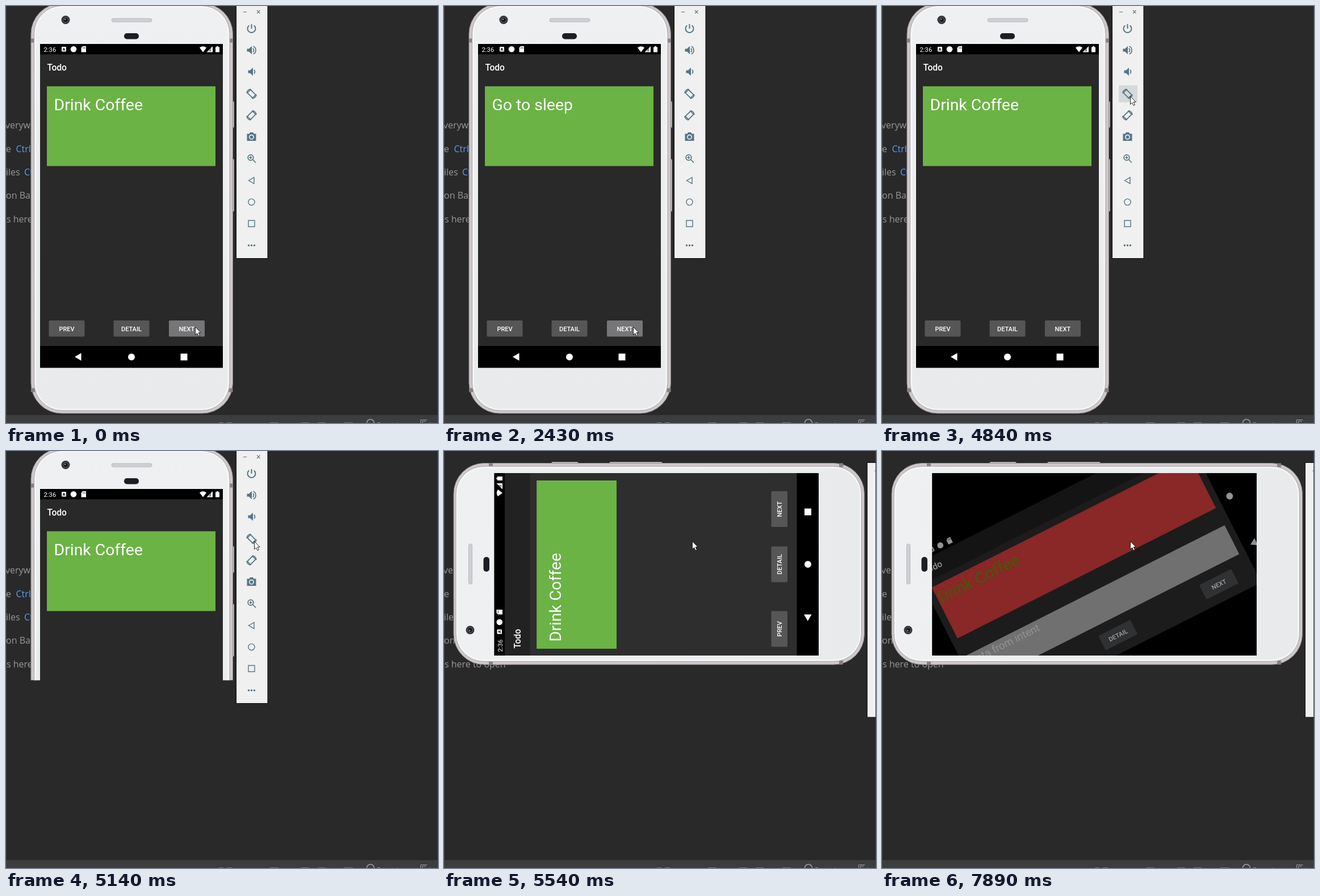
These frames come from a looping animation (761x736 px, 8000 ms). An HTML page:

```html
<!DOCTYPE html>
<html lang="en">
<head>
<meta charset="utf-8">
<title>Todo app in an emulator</title>
<style>
html, body { margin: 0; width: 100%; height: 100%; overflow: hidden; background: #292929; }
svg { display: block; }
.ui { font: 16px "Open Sans", sans-serif; fill: #989898; }
.app { font-family: Roboto, sans-serif; fill: #fff; }
.title { font-size: 15.6px; font-weight: 500; }
.task { font-size: 28.4px; }
.btn { font-size: 11px; font-weight: 500; text-anchor: middle; }
.line { fill: none; stroke: #557584; stroke-width: 1.7; }
.solid { fill: #557584; }
</style>
</head>
<body>
<svg width="761" height="736" viewBox="0 0 761 736">
  <defs>
    <clipPath id="glass"><rect x="60" y="67" width="322" height="571.5"/></clipPath>
    <clipPath id="wide"><rect x="88.5" y="39" width="571.5" height="322"/></clipPath>
    <clipPath id="upper"><rect width="761" height="404.5"/></clipPath>
    <linearGradient id="shell" x2="0" y2="1">
      <stop offset="0" stop-color="#eff0f2"/><stop offset="1" stop-color="#e8eaec"/>
    </linearGradient>
    <g id="notes" fill="#fff">
      <rect x="98" y="72" width="8" height="8.5" rx="1"/>
      <path d="M100 79l2-5 2 5M101 77.4h2" fill="none" stroke="#000"/>
      <circle cx="119" cy="76.3" r="5.3"/>
      <path d="M135 71h6v10.500h-8.500v-7.500z"/>
      <path d="M135.500 73v2M137.500 73v2M139.300 73v2" stroke="#000" stroke-width=".8"/>
    </g>
    <g id="turn">
      <rect x="-4" y="-6.500" width="8" height="13" rx="1" class="line" transform="rotate(-45)"/>
      <path d="M-8.500-1a8.500 8.500 0 0 1 6-7.300l2 2M8.500 1a8.500 8.500 0 0 1-6 7.300l-2-2" class="line" stroke-width="1.4"/>
    </g>
  </defs>

  <rect width="761" height="736" fill="#292929"/>
  <g class="ui">
    <text x="-1" y="216">verywhere</text>
    <text x="0" y="258">e</text><text x="17.500" y="258" fill="#589df6">Ctrl</text>
    <text x="0" y="299">iles</text><text x="32" y="299" fill="#589df6">Ctrl</text>
    <text x="0" y="340">on Bar</text>
    <text x="1" y="382">s here to open</text>
  </g>
  <rect y="722" width="761" height="14" fill="#3b3d3f"/>
  <g fill="none" stroke="#a0a0a0">
    <circle cx="642" cy="736" r="6.500" stroke-width="1.500"/>
    <path d="M730.500 736v-5.500h11M733.500 736v-3h6"/>
    <path d="M375 735.500h8M389 735.500h9M465 735.500h15M520 735.500h14M549 735.500h14M596 735.500h15" stroke="#777"/>
  </g>
  <text x="653" y="744" class="ui" style="font-size:12px">Event Log</text>
  <text x="745" y="744" class="ui" style="font-size:12px">Lay</text>
  <path d="M.5 0v736M760.500 0v736" stroke="#404244"/>

  <g id="cut"><g id="phone">
    <rect x="396" y="168" width="5.500" height="47" rx="2" fill="#d9d4d5" stroke="#8b8687"/>
    <rect x="396" y="270" width="5.500" height="93" rx="2" fill="#d9d4d5" stroke="#8b8687"/>
    <rect x="44" y="-4.500" width="355.500" height="723.500" rx="54" fill="#cfc8ca" stroke="#8d8788"/>
    <path d="M44 61h7M392.500 61h7M44 678h7M392.500 678h7" stroke="#858182" stroke-width="7"/>
    <rect x="49.500" y="-.5" width="344.500" height="714.500" rx="49" fill="url(#shell)" stroke="#aaa4a5"/>
    <rect x="52" y="1.500" width="339.500" height="710.500" rx="47" fill="none" stroke="#f7f7f8" stroke-width="2"/>
    <circle cx="105" cy="24.500" r="7.500" fill="#34363a"/>
    <circle cx="105" cy="24.500" r="4.300" fill="#15181c" stroke="#62676b"/>
    <circle cx="104" cy="23.500" r="1.300" fill="#8b959c"/>
    <rect x="186" y="22" width="71" height="6" rx="3" fill="#d0d0d4" stroke="#b8b8bd"/>
    <rect x="208" y="48" width="26" height="10.500" rx="5" fill="#1d1e25"/>
    <rect x="60" y="67" width="322" height="571.500"/>
    <g clip-path="url(#glass)"><g id="screen" class="app">
      <rect x="60" y="67" width="322" height="571.500" fill="#000"/>
      <rect id="body" x="60" y="85.500" width="322" height="514.500"/>
      <rect id="bar" x="60" y="85.500" width="322" height="44.500"/>
      <text x="66.500" y="81" font-size="11.300">2:36</text>
      <use href="#notes"/>
      <path d="M341 73.500q6-4.500 12 0l-6 8zM364 71v10.500h-10.500zM369 72.500h2v-1.500h3v1.500h2v9h-7z"/>
      <path d="M361 73v7h-4z" fill="#000" opacity=".5"/>
      <text x="72.500" y="113.500" class="title">Todo</text>
      <rect x="72" y="141.700" width="297" height="140.800" fill="#6bb345"/>
      <text id="task" x="84.500" y="184.300" class="task"></text>
      <g fill="#565656">
        <rect x="75.500" y="555" width="63" height="28.500" rx="1.500"/>
        <rect x="189.500" y="555" width="63" height="28.500" rx="1.500"/>
        <rect id="next" x="287" y="555" width="63" height="28.500" rx="1.500"/>
      </g>
      <g class="btn">
        <text x="107" y="573.500">PREV</text><text x="221" y="573.500">DETAIL</text><text x="318.300" y="573.500">NEXT</text>
      </g>
      <path d="M121 619.300l11.500-6.800v13.600zM307.500 613.500h12v12h-12z"/>
      <circle cx="221" cy="619.500" r="6"/>
    </g></g>
  </g></g>

  <g id="detail" clip-path="url(#wide)">
    <rect x="88" y="39" width="573" height="322"/>
    <g class="app" transform="rotate(-26.8 374 200)">
      <rect x="88" y="58" width="534" height="303" fill="#1c1c1c"/>
      <rect x="88" y="58" width="534" height="37.500" fill="#141414"/>
      <use href="#notes" x="28" y="-28.500" opacity=".58"/>
      <text x="100.500" y="82" class="title" fill="#929292">Todo</text>
      <rect x="100" y="107.500" width="510" height="100.500" fill="#8a2727"/>
      <text x="102.500" y="140" class="task" fill="#465909">Drink Coffee</text>
      <rect x="100" y="242" width="510" height="57" fill="#707070"/>
      <text x="102" y="261" font-size="18.700" fill="#929292">Data from intent</text>
      <g fill="#303133">
        <rect x="323.500" y="316" width="63" height="28.500" rx="1.500"/>
        <rect x="522.500" y="316" width="63" height="28.500" rx="1.500"/>
      </g>
      <g class="btn" fill="#a2a2a2">
        <text x="355" y="334.500">DETAIL</text><text x="554" y="334.500">NEXT</text>
      </g>
      <g fill="#929292">
        <circle cx="641" cy="200" r="6"/>
        <path d="M635 293l11.500-6.800v13.600z"/>
      </g>
    </g>
  </g>

  <g id="tools">
    <rect x="405.500" y="-1" width="55.500" height="446.500" fill="#f0f0f0" stroke="#0c0c0c"/>
    <rect id="press" x="417" y="140" width="33" height="30" fill="#d5d9db"/>
    <path d="M418 10.500h6M442 7.500l5.500 5.500M447.500 7.500l-5.500 5.500" class="line" style="stroke-width:1.100"/>
    <g transform="translate(432.500 40)">
      <path d="M0-8v8M-4.300-5.600a7 7 0 1 0 8.600 0" class="line" style="stroke-width:2"/>
      <path d="M-8 35.500h3.500l5-4.800v14.600l-5-4.800h-3.500zM-6 73.500h3.500l5-4.800v14.600l-5-4.800h-3.500z" class="solid"/>
      <path d="M2.500 34.500q3 3.500 0 7M3 31.200c6 2 6 11.600 0 13.600M4.500 72.500q3 3.500 0 7" class="line"/>
      <use href="#turn" y="115"/>
      <use href="#turn" transform="translate(0 153) scale(-1 1)"/>
      <path d="M-8 185.500h4l1.500-2.500h5l1.500 2.500h4v12.500h-16z" class="solid"/>
      <circle cy="191.300" r="3.700" fill="#557584" stroke="#f0f0f0" stroke-width="1.600"/>
      <circle cx="-1.500" cy="227.500" r="4.800" class="line"/>
      <path d="M2 231l5.500 5.500M-4 227.500h5M-1.500 225v5" class="line"/>
      <path d="M-5 268l9.500-5.500v11zM-5.500 338.500h11v11h-11z" class="line" style="stroke-width:1.400"/>
      <circle cy="306" r="5.600" class="line" style="stroke-width:1.400"/>
      <path d="M-5 382.500h.01M0 382.500h.01M5 382.500h.01" class="line" style="stroke-width:3.400;stroke-linecap:round"/>
    </g>
  </g>
  <g id="side">
    <rect x="745.500" y="20.500" width="20" height="449.500" fill="#f0f0f0" stroke="#0c0c0c"/>
    <path d="M758 35h3" stroke="#78909c"/>
    <path d="M760.500 21v449" stroke="#404244"/>
  </g>
  <path id="cursor" d="M.5.5v14l3.200-3 2.300 5 2.400-1-2.300-5h4z" fill="#fff" stroke="#111" stroke-width=".9"/>
</svg>
<script>
const $ = id => document.getElementById(id);
const show = (id, on) => $(id).style.display = on ? '' : 'none';
const dim = '#565656', mid = '#666667', lit = '#767678';

// Each track lists [start time, value]; a value holds until the next one.
const tracks = {
  task: [[0, 'Drink Coffee'], [130, 'Eat Lunch'], [950, 'Read Books'], [1690, 'Pay Bills'],
         [2430, 'Go to sleep'], [3100, 'Drink Coffee']],
  next: [[0, lit], [130, dim], [830, lit], [950, dim], [1540, lit], [1690, dim],
         [2430, lit], [2550, mid], [2670, dim], [3100, lit], [3220, mid], [3370, dim]],
  cursor: [[0, [333, 566]], [3930, [372, 227]], [4050, [402, 138]], [4200, [431, 153]],
           [4320, [435, 159]], [4470, [437, 159]]],
  press: [[0, false], [4840, true], [4990, false]],
  stage: [[0, 'tall'], [5140, 'cut'], [5420, 'flat'], [7760, 'tilt'], [7890, 'detail']]
};
const at = (name, t) => tracks[name].findLast(step => step[0] <= t)[1];

function draw(now) {
  const t = now % 8000, stage = at('stage', t);
  const tall = stage === 'tall' || stage === 'cut', tilt = stage === 'tilt';

  $('task').textContent = at('task', t);
  $('next').setAttribute('fill', at('next', t));
  $('cursor').setAttribute('transform', `translate(${at('cursor', t)})`);
  show('press', at('press', t));
  show('tools', tall);
  show('side', !tall);
  show('detail', stage === 'detail');

  $('cut').setAttribute('clip-path', stage === 'cut' ? 'url(#upper)' : 'none');
  $('phone').setAttribute('transform', tall ? '' : 'translate(21.5 421) rotate(-90)');
  $('screen').setAttribute('transform', tilt ? 'rotate(5.8 221 352.5)' : '');
  $('screen').setAttribute('opacity', tilt ? 0.89 : 1);
  $('body').setAttribute('fill', tall ? '#292929' : '#2e2e2e');
  $('bar').setAttribute('fill', tall ? '#292929' : '#222222');
  requestAnimationFrame(draw);
}
draw(0);
</script>
</body>
</html>
```
